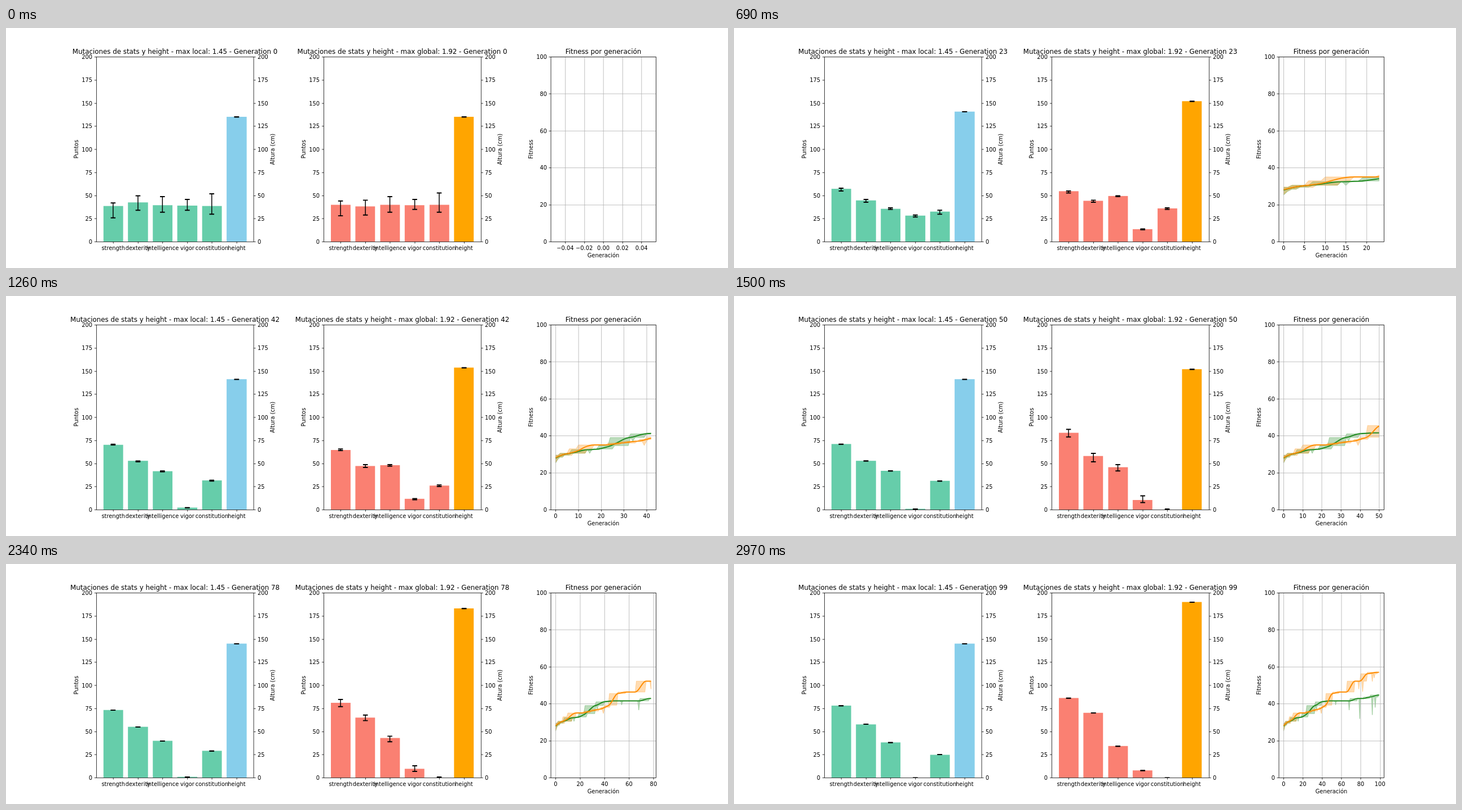
Recreate the animation shown at these times as an HTML page with a canvas. Size 1280x427 px, loop 3 s.

```html
<!DOCTYPE html>
<html lang="es">
<meta charset="utf-8">
<style>
html, body { margin: 0; width: 100%; height: 100%; overflow: hidden; background: #fff; }
canvas { display: block; }
</style>
<canvas width="1280" height="427"></canvas>
<script>
// Everything is laid out on an 1800 x 600 sheet, 100 dots per inch, sizes in points.
const ctx = document.querySelector('canvas').getContext('2d');
ctx.scale(1280 / 1800, 427 / 600);
const PT = 100 / 72, THIN = .8 * PT, TICK = 5, PAD = 7 * PT;
const TOP = 72, BOTTOM = 534, MID = (TOP + BOTTOM) / 2;
const NAMES = ['strength', 'dexterity', 'intelligence', 'vigor', 'constitution', 'height'];
const KEYS = [0, 23, 34, 50, 78, 99];

// Each improvement: generation found, generations to spread, gain in fitness.
// Dips: generations with a weak individual and how far it falls.
const local = {
  title: 'max local: 1.45', colors: ['#66cdaa', '#87ceeb'],
  line: '#228b22', band: 'rgba(34,139,34,.3)',
  base: 27.2,
  steps: [[-2, 4, 1.1], [-1, 5, 1.1], [1, 6, 1.1], [6, 8, 1.9], [14, 6, .4], [18, 8, 1.8], [23, 10, 4.4],
    [32, 8, 2], [39, 8, .5], [68, 9, 1.3], [82, 8, .8], [89, 10, 1.1]],
  dips: { 0: 2, 15: 2, 34: 2, 54: 2.2, 68: 5, 79: 11, 92: 9.7, 95: 5.7 },
  means: [[38.5, 57, 65.5, 71, 73, 78], [42.5, 44.5, 51.5, 53, 55, 57.5], [39.5, 35.5, 40, 42, 40, 38],
    [39, 28, 7.5, 1, 1, .2], [38.5, 32.5, 34, 31, 29, 24.5], [135, 140.5, 141, 141, 145, 145]]
};
const overall = {
  title: 'max global: 1.92', colors: ['#fa8072', '#ffa500'],
  line: '#ff8c00', band: 'rgba(255,140,0,.3)',
  base: 27.5,
  steps: [[-2, 4, 1], [-1, 5, 1], [1, 6, 1], [5, 9, 2.4], [9, 8, 2.1], [22, 7, 1], [28, 8, 1], [36, 5, 1],
    [39, 6, 1.2], [43, 8, 6.3], [50, 8, .8], [65, 9, 5.9], [79, 8, 4], [86, 12, .8]],
  dips: { 0: 2, 7: 1.2, 39: 2.3, 78: 4.3, 82: 5.7, 92: 4.2, 94: 2.3 },
  means: [[40, 54.5, 59.5, 83, 81, 86], [38, 44, 44.5, 58, 65, 70], [40, 49.5, 48.5, 46, 43, 34],
    [39.5, 13.5, 12, 10.5, 9.5, 8], [40, 36, 33, 0, 0, 0], [135, 152, 154, 152, 183, 190]]
};

const clamp = v => Math.min(1, Math.max(0, v));
const smooth = v => clamp(v) ** 2 * (3 - 2 * clamp(v));
const random = n => { const v = Math.sin(n * 12.9898) * 43758.5453; return v - Math.floor(v); };
const snap = v => Math.floor(v + .5) + .5;
const yOf = (v, max) => BOTTOM - v / max * (BOTTOM - TOP);

// The best individual jumps first, the mean follows, the worst arrives last.
const climb = (run, share) => run.steps.reduce((sum, [at, span, gain]) => sum + gain * share(at, span), run.base);
const best = (run, g) => climb(run, at => clamp(g - at));
const mean = (run, g) => climb(run, (at, span) => smooth((g - at) / span));
const worst = (run, g) => climb(run, (at, span) => clamp(g - at - span + 1)) - (run.dips[g] || 0);

// Traits move from key to key as the mean fitness rises.
function trait(run, row, g) {
  const i = Math.max(0, KEYS.findIndex(k => k >= g) - 1);
  const from = mean(run, KEYS[i]), to = mean(run, KEYS[i + 1]);
  return row[i] + (row[i + 1] - row[i]) * clamp((mean(run, g) - from) / (to - from));
}

// Error bars are as wide as the population is diverse; heights hardly vary.
function limits(run, value, i, g) {
  if (i === 5) return [value, value];
  const spread = (best(run, g) - worst(run, g)) * (.6 + 1.4 * Math.exp(-g / 15));
  const reach = n => Math.min(spread, value + 1) * (.4 + 1.2 * random(g * 12 + i * 2 + n + 1));
  return [Math.max(0, Math.round(value - reach(0))), Math.round(value + reach(1))];
}

function text(str, x, y, align = 'center', size = 10) {
  ctx.font = `${size * PT}px "DejaVu Sans", sans-serif`;
  ctx.textAlign = align;
  ctx.fillStyle = '#000';
  ctx.fillText(str, x, y);
}

function sideText(str, x) {
  ctx.save();
  ctx.translate(x, MID);
  ctx.rotate(-Math.PI / 2);
  text(str, 0, 0);
  ctx.restore();
}

function line(x0, y0, x1, y1, width = THIN, color = '#000') {
  ctx.lineWidth = width;
  ctx.strokeStyle = color;
  ctx.beginPath();
  ctx.moveTo(x0, y0);
  ctx.lineTo(x1, y1);
  ctx.stroke();
}

function clipped(left, right, draw) {
  ctx.save();
  ctx.beginPath();
  ctx.rect(left, TOP, right - left, BOTTOM - TOP);
  ctx.clip();
  draw();
  ctx.restore();
}

function frame(left, right, max, step, twin) {
  const x0 = snap(left), x1 = snap(right);
  ctx.lineWidth = THIN;
  ctx.strokeStyle = '#000';
  ctx.strokeRect(x0, snap(TOP), x1 - x0, BOTTOM - TOP);
  for (let v = 0; v <= max; v += step) {
    const y = snap(yOf(v, max));
    line(x0 - TICK, y, x0, y);
    text(v, left - PAD, y + 5, 'right');
    if (!twin) continue;
    line(x1, y, x1 + TICK, y);
    text(v, right + PAD, y + 5, 'left');
  }
}

function xTick(x, label) {
  line(snap(x), BOTTOM, snap(x), BOTTOM + TICK);
  text(label, x, 555);
}

function barChart(run, left, g) {
  const right = left + 392.34, unit = 392.34 / 6.38;
  const xOf = i => left + (i + .69) * unit;
  clipped(left, right, () => run.means.forEach((row, i) => {
    const x = Math.round(xOf(i)), x0 = Math.round(xOf(i - .4)), x1 = Math.round(xOf(i + .4));
    const value = trait(run, row, g), y = Math.round(yOf(value, 200));
    const [low, high] = limits(run, value, i, g).map(v => snap(yOf(v, 200)));
    ctx.fillStyle = run.colors[i === 5 ? 1 : 0];
    ctx.fillRect(x0, y, x1 - x0, BOTTOM - y);
    line(x, low, x, high, 1.5 * PT);
    for (const cap of [low, high]) line(x - 6, cap, x + 6, cap, 2 * PT);
  }));
  frame(left, right, 200, 25, true);
  NAMES.forEach((name, i) => xTick(xOf(i), name));
  sideText('Puntos', left - 45);
  sideText('Altura (cm)', right + 52.5);
  text(`Mutaciones de stats y height - ${run.title} - Generation ${g}`, (left + right) / 2, 64, 'center', 12);
}

function fitnessChart(g) {
  const left = 1358.44, right = 1620, middle = (left + right) / 2;
  const lo = g ? -.05 * g : -.055, hi = g ? 1.05 * g : .055;
  const xOf = v => left + (v - lo) / (hi - lo) * (right - left);
  const step = [.02, .2, .5, 1, 2, 2.5, 5, 10, 20].find(s => s >= (hi - lo) / 6 - 1e-9);
  const digits = step === .02 ? 2 : step % 1 ? 1 : 0;
  const ticks = [];
  for (let k = Math.ceil(lo / step); k * step <= hi; k++) ticks.push(k * step);

  const trace = (run, level, back) => {
    for (let i = 0; i <= g; i++) {
      const n = back ? g - i : i;
      ctx.lineTo(xOf(n), yOf(level(run, n), 100));
    }
  };
  clipped(left, right, () => {
    ctx.lineJoin = 'round';
    if (g) for (const run of [local, overall]) {
      ctx.beginPath();
      trace(run, best);
      trace(run, worst, true);
      ctx.closePath();
      ctx.fillStyle = ctx.strokeStyle = run.band;
      ctx.lineWidth = PT;
      ctx.fill();
      ctx.stroke();
    }
    for (const t of ticks) line(snap(xOf(t)), TOP, snap(xOf(t)), BOTTOM, THIN, '#b0b0b0');
    for (let v = 0; v <= 100; v += 20) line(left, snap(yOf(v, 100)), right, snap(yOf(v, 100)), THIN, '#b0b0b0');
    if (g) for (const run of [local, overall]) {
      ctx.beginPath();
      trace(run, mean);
      ctx.strokeStyle = run.line;
      ctx.lineWidth = 2 * PT;
      ctx.stroke();
    }
  });
  frame(left, right, 100, 20);
  for (const t of ticks) xTick(xOf(t), t.toFixed(digits).replace('-', '\u2212'));
  sideText('Fitness', left - 45);
  text('Generación', middle, 574);
  text('Fitness por generación', middle, 64, 'center', 12);
}

function draw() {
  const g = Math.floor(performance.now() % 3000 / 30);
  ctx.fillStyle = '#fff';
  ctx.fillRect(0, 0, 1800, 600);
  barChart(local, 225, g);
  barChart(overall, 791.72, g);
  fitnessChart(g);
  requestAnimationFrame(draw);
}
draw();
</script>
</html>
```
